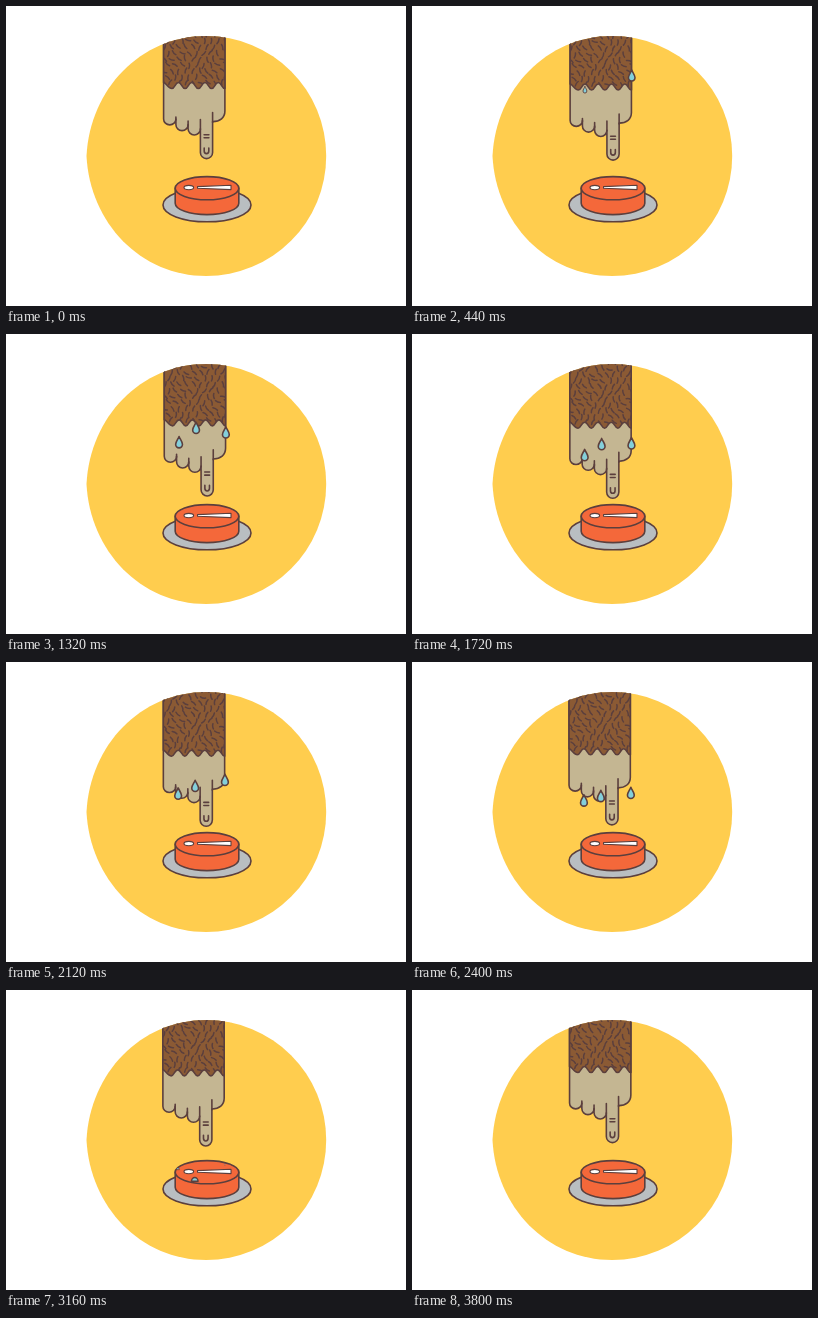
An HTML page for the animation above (3840 ms loop, 400 px wide and 300 px high).

```html
<!DOCTYPE html>
<html lang="en">
<head>
<meta charset="utf-8">
<title>Nervous finger over a button</title>
<style>
  html, body { margin: 0; width: 100%; height: 100%; overflow: hidden; background: #fff; }
  svg { display: block; width: 100vw; height: 100vh; }
  .line { stroke: #5b3f3d; stroke-width: 1.6; stroke-linecap: round; stroke-linejoin: round; }
</style>
</head>
<body>
<svg viewBox="0 0 400 300">
  <defs>
    <path id="discShape" d="M200.2 30A120 120 0 0 1 200.2 270C134.5 270 84 217 80.5 150C84 83 134.5 30 200.2 30Z"/>
    <clipPath id="disc"><use href="#discShape"/></clipPath>
    <clipPath id="furShape"><path id="furClip"/></clipPath>
  </defs>
  <use href="#discShape" fill="#ffcd4e"/>

  <g class="line">
    <ellipse cx="201" cy="199" rx="44" ry="16.8" fill="#b9bec1"/>
    <path d="M169.2 182V197.2A31.8 11.4 0 0 0 232.8 197.2V182Z" fill="#f4683a"/>
    <ellipse cx="201" cy="182.2" rx="31.8" ry="11.6" fill="#f4683a"/>
    <g fill="#fff" stroke-width="1.1">
      <ellipse cx="182.8" cy="181.6" rx="4.8" ry="2.2"/>
      <path d="M191.5 180.6L225 179.2V183.6L191.5 182.3Z"/>
    </g>
  </g>

  <g clip-path="url(#disc)">
    <g id="hand" class="line" fill="none">
      <path fill="#c4b692" d="M157.6 10V113a6.1 5.8 0 0 0 12.3 0V118.5a6 6 0 0 0 12.2 0V122.7a6.1 6.2 0 0 0 12.3 0V146.4a6.1 6.2 0 0 0 12.2 0V115.6C214 115.6 218.9 111.6 218.9 105V10Z"/>
      <path d="M169.9 111v3M182.1 115v5M194.4 113.5v10M206.6 106.5v10"/>
      <path d="M198.1 128.7h4.8M198.1 131.8h4.8M198.2 142v3a2.3 2.6 0 0 0 4.6 0v-3"/>
      <path id="fur" fill="#8b5a34"/>
      <path id="hair" stroke-width="1.5" clip-path="url(#furShape)"/>
    </g>
  </g>
  <g id="drops" class="line" fill="#84cfda" stroke-width="1.1"></g>
</svg>
<script>
const LOOP = 3840, GRAVITY = 2.88e-4, SINK = 550;
const DROP = 'M0 -5.8C1 -3.2 3.4 -.7 3.4 2A3.4 3.5 0 0 1 -3.4 2C-3.4 -.7 -1 -3.2 0 -5.8Z';
const DOME = 'M-3.6 2.2A3.6 4 0 0 1 3.6 2.2Z';
const $ = id => document.getElementById(id);

// Sleeve with a scalloped hem
let furPath = 'M157.6 10V76.5c3 1 5 6 8.2 6';
for (let i = 0; i < 4; i++) furPath += 'c3.2 0 3.3 -6 6.64 -6s3.4 6 6.64 6';
furPath += 'V10Z';
$('fur').setAttribute('d', furPath);
$('furClip').setAttribute('d', furPath);

// Short, slightly bent hairs on a jittered grid
let seed = 11;
const random = () => (seed = seed * 16807 % 2147483647) / 2147483647;
let hairs = '';
for (let row = 0; row < 11; row++) {
  for (let col = 0; col < 9; col++) {
    const x = 157 + col * 7.2 + (row % 2) * 3.6 + random() * 2;
    const y = 16 + row * 6 + random() * 2;
    const angle = 1.35 + Math.sin(col * .9 + row * .6) * .7 + (random() - .5) * .9;
    const dx = Math.cos(angle) * 2.6, dy = Math.sin(angle) * 2.6;
    const bend = random() < .5 ? -.4 : .4;
    hairs += `M${x - dx} ${y - dy}Q${x - dy * bend} ${y + dx * bend} ${x + dx} ${y + dy}`;
  }
}
$('hair').setAttribute('d', hairs);

// path: [time, y on the hand] pairs, the last one being the moment of release
const drops = [
  { x: 172.4, floor: 178.4, path: [[300, 80], [760, 88], [1320, 99], [2120, 120], [2320, 126]] },
  { x: 189.4, floor: 189.2, path: [[900, 74], [1320, 84.7], [2120, 112.3], [2500, 128]] },
  { x: 219.2, floor: 174.6, path: [[200, 63], [760, 75], [1320, 89.2], [2120, 106.3], [2200, 108]] },
];
for (const drop of drops) {
  drop.node = document.createElementNS('http://www.w3.org/2000/svg', 'path');
  $('drops').append(drop.node);
}

const phase = t => t / LOOP * 2 * Math.PI;
const sway = t => .8 * Math.sin(phase(t));
const lower = t => 6 * (1 - Math.cos(phase(t)));

function along(path, t) {
  const i = Math.max(1, path.findIndex(p => p[0] >= t));
  const [t0, y0] = path[i - 1], [t1, y1] = path[i];
  return y0 + (y1 - y0) * (t - t0) / (t1 - t0);
}

function drawDrop({ x, floor, path, node }, t) {
  const start = path[0][0], release = path[path.length - 1][0];
  const held = Math.min(t, release);
  const top = along(path, held) + lower(held);
  const y = top + GRAVITY * (t - held) ** 2;
  const impact = release + Math.sqrt((floor - top) / GRAVITY);
  const landed = t >= impact;
  const sunk = (t - impact) / SINK;
  const size = landed ? 1 - sunk ** 3 : Math.min(1, (t - start) / 250);
  node.style.display = size > 0 && t > start && sunk < 1 ? '' : 'none';
  node.setAttribute('d', landed ? DOME : DROP);
  node.setAttribute('transform', `translate(${x + sway(held)} ${landed ? floor : y}) scale(${size})`);
}

function draw(now) {
  const t = now % LOOP;
  $('hand').setAttribute('transform', `translate(${sway(t)} ${lower(t)})`);
  drops.forEach(drop => drawDrop(drop, t));
  requestAnimationFrame(draw);
}
requestAnimationFrame(draw);
</script>
</body>
</html>
```
